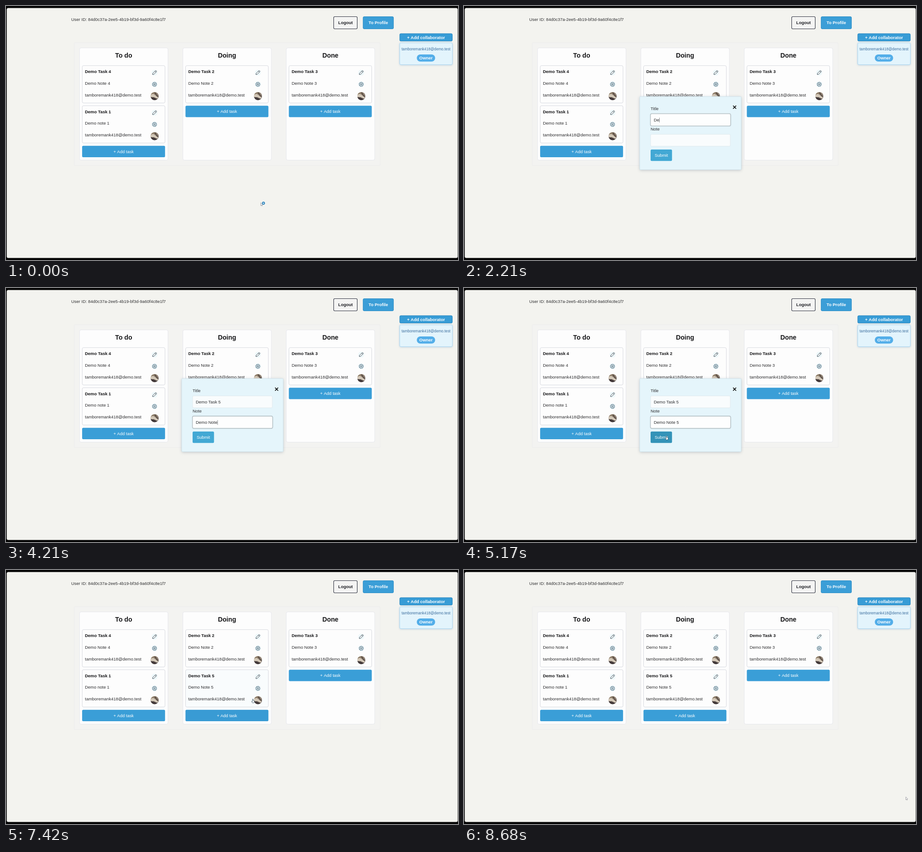
Recreate the animation shown at these times as an HTML page with a canvas. Size 998x561 px, loop 8.73 s.

```html
<!DOCTYPE html>
<html lang="en">
<head>
<meta charset="utf-8">
<title>Task board</title>
<style>
html, body { margin: 0; width: 100%; height: 100%; overflow: hidden; background: #000; }
canvas { display: block; }
</style>
</head>
<body>
<canvas id="stage" width="998" height="561"></canvas>
<script>
const g = document.getElementById('stage').getContext('2d');
const LOOP = 8730, STEP = 228.2, ROW = 88.5;
const EMAIL = 'tamboremank418@demo.test';
const OPEN = 1550, CLOSE = 5550, ADDED = 5650, TAB = 3080;
const BLUE = [58, 158, 215], BLUE_HOVER = [43, 132, 183];

// Pointer path: time, x, y of the tip
const PATH = [
  [0, 562.5, 434.5], [350, 562.5, 434.5], [1150, 539, 230.5], [1600, 539, 230.5],
  [1850, 526, 248], [4500, 526, 248], [5050, 447.5, 327], [5800, 447.5, 327],
  [6400, 486, 345], [6500, 486, 345], [7100, 545, 464], [7200, 545, 464],
  [7480, 545, 262], [7760, 584.5, 264], [8500, 975.5, 501], [LOOP, 975.5, 501]
];

function pointer(t) {
  const i = Math.max(1, PATH.findIndex(p => p[0] > t));
  const [a, b] = [PATH[i - 1], PATH[i]];
  let k = Math.max(0, (t - a[0]) / (b[0] - a[0]));
  k = k * k * (3 - 2 * k);
  return [a[1] + (b[1] - a[1]) * k, a[2] + (b[2] - a[2]) * k];
}

const modalOpen = t => t >= OPEN && t < CLOSE;

function inside(t, x, y, w, h) {
  const [px, py] = pointer(t);
  return px >= x && px <= x + w && py >= y && py <= y + h;
}

// Hover amount averaged over the last moments gives a short transition
function hover(t, rect, inModal = false) {
  let sum = 0;
  for (let k = 0; k < 10; k++) {
    const s = Math.max(0, t - k * 18);
    if (modalOpen(s) === inModal && inside(s, ...rect)) sum++;
  }
  return sum / 10;
}

const mix = (a, b, k) => `rgb(${a.map((v, i) => Math.round(v + (b[i] - v) * k))})`;

function box(x, y, w, h, r, fill, stroke, line = 1) {
  g.beginPath();
  g.roundRect(x, y, w, h, r);
  if (fill) { g.fillStyle = fill; g.fill(); }
  if (stroke) { g.strokeStyle = stroke; g.lineWidth = line; g.stroke(); }
}

function shadowed(blur, dy, color, draw) {
  g.save();
  g.shadowBlur = blur;
  g.shadowOffsetY = dy;
  g.shadowColor = color;
  draw();
  g.restore();
}

function text(str, x, y, { size = 9.45, bold = false, color = '#2e2e30', align = 'left' } = {}) {
  g.font = `${bold ? 'bold ' : ''}${size}px "Liberation Sans", Arial, sans-serif`;
  g.fillStyle = color;
  g.textAlign = align;
  g.fillText(str, x, y);
}

function at(x, y, draw) {
  g.save();
  g.translate(x, y);
  draw();
  g.restore();
}

function poly(points, fill, stroke, line = 1) {
  g.beginPath();
  points.forEach(p => g.lineTo(...p));
  g.closePath();
  if (fill) { g.fillStyle = fill; g.fill(); }
  if (stroke) { g.strokeStyle = stroke; g.lineWidth = line; g.stroke(); }
}

function disc(x, y, r, fill, stroke, line) {
  box(x - r, y - r, 2 * r, 2 * r, r, fill, stroke, line);
}

function pencil() {
  disc(0, 0, 6.5, '#eef8fb');
  g.rotate(-Math.PI / 4);
  g.lineJoin = 'round';
  poly([[-6, 0], [-4, -1.6], [4.6, -1.6], [5.6, -.7], [5.6, .7], [4.6, 1.6], [-4, 1.6]], '#f8fcfd', '#2e3d47', .85);
  poly([[3, -1.6], [3, 1.6]], null, '#2e3d47', .5);
}

function gear() {
  disc(0, 0, 6.5, '#e6f4fa');
  const teeth = Array.from({ length: 32 }, (_, i) => {
    const a = (i + .5) * Math.PI / 16, r = i % 4 < 2 ? 4.7 : 3.8;
    return [r * Math.cos(a), r * Math.sin(a)];
  });
  poly(teeth, null, '#2f4a59', .95);
  disc(0, 0, 1.6, null, '#2f4a59', .95);
}

function avatar() {
  g.beginPath();
  g.arc(0, 0, 9, 0, 7);
  g.clip();
  const tone = g.createLinearGradient(-6, -8, 6, 9);
  tone.addColorStop(0, '#8a7860');
  tone.addColorStop(.5, '#95877a');
  tone.addColorStop(1, '#3a302f');
  g.fillStyle = tone;
  g.fillRect(-9, -9, 18, 18);
  poly([[-9, -3], [-3, -5], [8, 3], [6, 6], [-2, 2], [-9, 3]], '#d3c8b8');
  poly([[-9, 2], [-2, 3], [5, 7], [0, 10], [-9, 9]], '#42393a');
  poly([[-1, -8], [2, -8], [7, 1], [5, 1]], '#564a42');
}

function button(t, x, y, w, h, label) {
  const k = hover(t, [x, y, w, h]);
  box(x, y, w, h, 2.5, mix(BLUE, BLUE_HOVER, k));
  text(label, x + w / 2, y + h / 2 + 3.3, { color: '#fff', align: 'center' });
}

function card(t, x, y, title, note) {
  const k = hover(t, [x, y, 182.8, 82.5]);
  box(x, y, 182.8, 82.5, 3, mix([253, 253, 253], [234, 249, 252], k), '#d6d8de');
  text(title, x + 6, y + 16.4, { bold: true, color: '#141416' });
  text(note, x + 6, y + 42.2);
  text(EMAIL, x + 6, y + 67.8);
  at(x + 159.6, y + 15.5, pencil);
  at(x + 159.6, y + 41.3, gear);
  at(x + 159.9, y + 67.2, avatar);
}

function column(t, i, name, tasks) {
  const x = 162.4 + i * STEP;
  box(x, 92.5, 195.3, 248, 3.5, '#fdfdfd', '#e6e7ec');
  text(name, x + 97.4, 114, { size: 14.2, bold: true, color: '#151517', align: 'center' });
  tasks.forEach(([title, note], n) => card(t, x + 5.9, 131.7 + n * ROW, title, note));
  button(t, x + 5.7, 220.2 + (tasks.length - 1) * ROW, 183.1, 25.4, '+ Add task');
}

function header() {
  text('User ID: 84d0c37a-2ee5-4b19-bf3d-9a60f4c8e1f7', 144, 33.2);
  box(723.5, 23.5, 52, 27, 2.5, '#f4f4f3', '#2c2f3e', 1.1);
  text('Logout', 749.6, 40.3, { bold: true, color: '#1b1c22', align: 'center' });
  box(788.4, 23.5, 67.2, 27, 2.5, '#3b9ed7', '#2c8dc6');
  text('To Profile', 822, 40.3, { bold: true, color: '#fff', align: 'center' });
}

function collaborators() {
  shadowed(4, 1, 'rgba(50,120,180,.3)', () => box(869.3, 81.3, 116.2, 48.2, 2.5, '#e3f4fc'));
  box(869.3, 81.3, 116.2, 48.2, 2.5, null, '#acd7f3');
  box(869.3, 61, 116.2, 16.6, 2.5, '#379cd6', '#2a87bf');
  text('+ Add collaborator', 927.3, 72.8, { bold: true, color: '#fff', align: 'center' });
  text(EMAIL, 927.3, 97.6, { size: 8.2, color: '#3a6d9e', align: 'center' });
  box(907, 107, 40.5, 15.8, 7.9, '#53aee9');
  text('Owner', 927.3, 118.3, { bold: true, color: '#fff', align: 'center' });
}

function typed(str, t, from, to) {
  return str.slice(0, Math.max(0, Math.floor((t - from) / (to - from) * str.length)));
}

function field(t, y, label, value, focused, since) {
  text(label, 412, y - 8.7);
  if (focused) {
    shadowed(2, 0, 'rgba(110,125,130,.5)', () => box(411.7, y - .3, 177, 27, 3, '#fdfefe'));
    box(411.7, y - .3, 177, 27, 3, null, '#b3bec2', 1.3);
  } else box(412, y, 176, 26.5, 2.5, '#f9fcfd', '#dfe9ed');
  text(value, 419, y + 16.6);
  if (focused && (t - since) % 1060 < 530) {
    g.fillStyle = '#6a6e71';
    g.fillRect(419 + g.measureText(value).width, y + 8.5, .8, 10.5);
  }
}

function modal(t) {
  shadowed(6, 1.5, 'rgba(60,80,100,.28)', () => box(388, 200, 224, 161.5, 1.5, '#e5f5fb'));
  box(388, 200, 224, 161.5, 1.5, null, '#d0e2ea');
  g.strokeStyle = '#111';
  g.lineWidth = 1.6;
  g.beginPath();
  for (const s of [-1, 1]) {
    g.moveTo(597.5 - 3.4, 223.5 - 3.4 * s);
    g.lineTo(597.5 + 3.4, 223.5 + 3.4 * s);
  }
  g.stroke();
  const inTitle = t >= 1880 && t < TAB;
  field(t, 238.2, 'Title', typed('Demo Task 5', t, 2000, 2900), inTitle, 1880);
  field(t, 283.3, 'Note', typed('Demo Note 5', t, 3350, 4300), t >= TAB, TAB);
  const k = hover(t, [412, 317, 47.3, 25.3], true);
  box(412, 317, 47.3, 25.3, 2.5, mix([66, 168, 212], [52, 147, 184], k));
  text('Submit', 435.6, 333, { color: '#fff', align: 'center' });
}

function cursor(t, addY) {
  const open = modalOpen(t);
  if (open && t > 2000 && t < 4500) return;
  const [x, y] = pointer(t);
  const on = (...rect) => inside(t, ...rect);
  const hand = open ? on(412, 317, 47.3, 25.3)
    : on(396.3, addY, 183, 25.4) || on(396.3, 131.7, 183, addY - 137);
  const beam = open && (on(412, 238, 176, 27) || on(412, 283, 177, 27));
  at(x, y, () => {
    g.lineJoin = 'round';
    if (beam) {
      g.fillStyle = '#555';
      g.fillRect(-.4, -4.5, .8, 9);
      g.fillRect(-1.6, -4.5, 3.2, .7);
      g.fillRect(-1.6, 3.8, 3.2, .7);
    } else if (hand) {
      poly([[-.7, 0], [.7, 0], [.9, 3], [3.3, 3.8], [3.2, 6.2], [2.3, 8.3], [-1, 8.3], [-2.8, 5.2], [-2, 4.6], [-.8, 5.5]],
        '#fff', '#1e3a4d', .7);
    } else {
      poly([[0, 0], [0, 6.6], [1.5, 5.3], [2.5, 7.3], [3.4, 6.9], [2.5, 4.9], [4.5, 4.8]], '#fbfbfc', '#8a8b92', .75);
      if (t < 300) disc(6, 1, 2.4, '#d5eefb', '#1b78b4', 1.6);
    }
  });
}

function draw(t) {
  g.fillStyle = '#050505';
  g.fillRect(0, 0, 998, 561);
  box(1.6, 4.6, 995.8, 551.8, 3.5, '#f3f3ef');
  box(150.5, 81, 675.5, 271.3, 2, '#f3f3f1', '#ececec');
  header();
  collaborators();
  const doing = [['Demo Task 2', 'Demo Note 2']];
  if (t >= ADDED) doing.push(['Demo Task 5', 'Demo Note 5']);
  column(t, 0, 'To do', [['Demo Task 4', 'Demo Note 4'], ['Demo Task 1', 'Demo note 1']]);
  column(t, 1, 'Doing', doing);
  column(t, 2, 'Done', [['Demo Task 3', 'Demo Note 3']]);
  if (modalOpen(t)) modal(t);
  cursor(t, 220.2 + (doing.length - 1) * ROW);
}

const start = performance.now();
function tick() {
  draw((performance.now() - start) % LOOP);
  requestAnimationFrame(tick);
}
tick();
</script>
</body>
</html>
```
